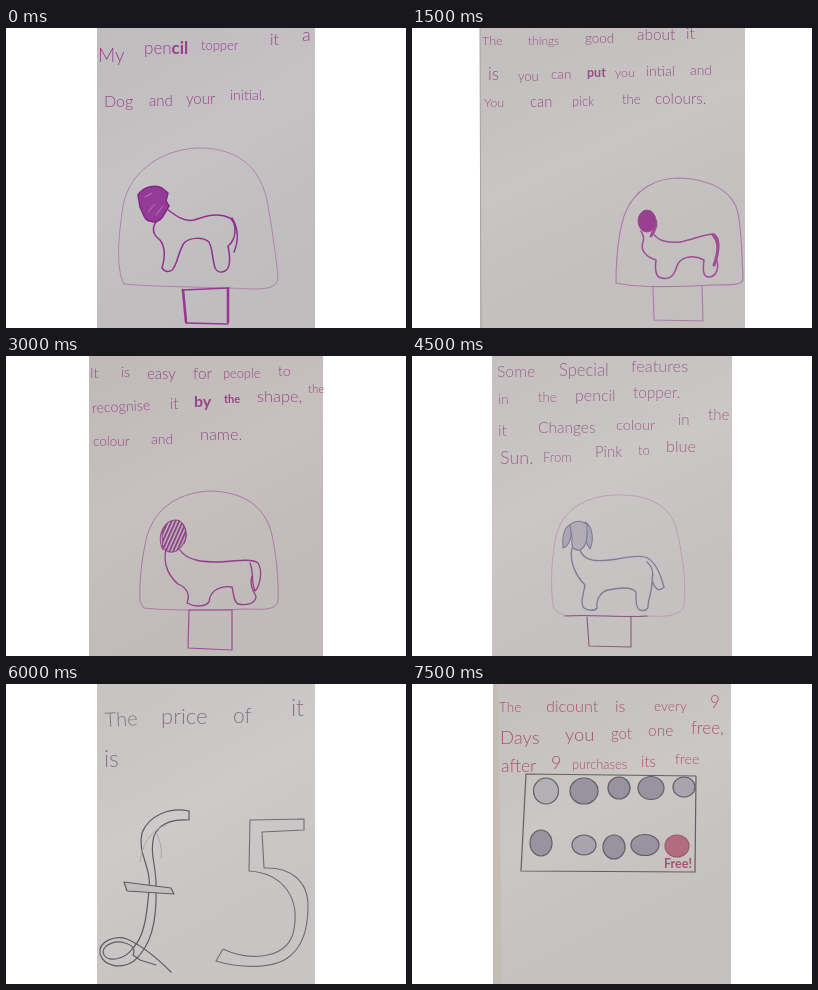
These frames come from a looping animation (400x300 px, 8 s). An HTML page:

```html
<!DOCTYPE html>
<html lang="en">
<head>
<meta charset="utf-8">
<title>Pencil topper</title>
<style>
  html, body { margin: 0; width: 100%; height: 100%; overflow: hidden; background: #fff; }
  svg { display: block; width: 100vw; height: 100vh; }
  text { font-family: Lato, "Open Sans", sans-serif; font-weight: 300; fill: var(--ink); stroke: none; }
  .page { --ink: #a0508f; fill: none; stroke: var(--ink); stroke-linecap: round; stroke-linejoin: round;
          visibility: hidden; animation: page 8s step-end infinite; animation-delay: calc(var(--i) * 1.5s - 8s); }
  .page.last { animation-name: last; }
  .paper { stroke: none; }
  .bold { font-weight: 700; }
  @keyframes page { 0% { visibility: visible } 18.75%, 100% { visibility: hidden } }
  @keyframes last { 0% { visibility: visible } 6.25%, 100% { visibility: hidden } }
</style>
</head>
<body>
<svg viewBox="0 0 400 300">
  <defs>
    <linearGradient id="shade" x1="0" y1="0" x2=".4" y2="1">
      <stop offset="0" stop-color="#000" stop-opacity=".02"/>
      <stop offset=".5" stop-color="#fff" stop-opacity=".04"/>
      <stop offset="1" stop-color="#000" stop-opacity=".02"/>
    </linearGradient>
    <pattern id="hatch" width="3.4" height="8" patternUnits="userSpaceOnUse" patternTransform="rotate(24)">
      <path d="M1 0V8" stroke="#8d4589" stroke-width="2"/>
    </pattern>
  </defs>

  <g class="page" style="--i:0; --ink:#963f90">
    <g class="paper"><path d="M91 0H309V300H91Z" fill="#c4c1c2"/><path d="M91 0H309V300H91Z" fill="url(#shade)"/></g>
    <text x="92" y="34" font-size="19">My</text>
    <text x="138" y="26" font-size="17">pen<tspan class="bold">cil</tspan></text>
    <text x="195" y="22" font-size="13">topper</text>
    <text x="264" y="17" font-size="16">it</text>
    <text x="296" y="13" font-size="18">a</text>
    <text x="98" y="79" font-size="16">Dog</text>
    <text x="143" y="78" font-size="15">and</text>
    <text x="180" y="76" font-size="15">your</text>
    <text x="224" y="72" font-size="14">initial.</text>
    <path stroke="#b283ae" d="M118 256C109 240 113 205 117 178C124 140 160 121 192 120C240 120 255 147 261 172C266 200 271 235 272 250C270 260 262 261 245 261C210 259 150 259 118 256"/>
    <path stroke="#983694" stroke-width="1.4" d="M176 262L223 260M180 295L222 296"/>
    <path stroke="#983694" stroke-width="2.6" d="M177 262L180 294M222 261L222 294"/>
    <path stroke="#93308f" stroke-width="1.5" d="M161 181C170 188 178 194 188 192C200 188 212 184 224 190C231 196 231 211 222 218C224 228 225 240 219 243C215 245 211 244 209 240C206 230 207 222 203 214C197 209 184 209 178 215C172 224 171 238 166 242C162 245 158 243 156 240C159 230 160 220 154 212C146 206 146 200 150 194M226 190C232 200 233 212 228 224"/>
    <path fill="#933b96" stroke="#862786" stroke-width="1.5" d="M132 167C137 159 149 156 156 160L162 165L160 173L163 178C159 184 157 193 148 194C143 193 140 193 138 188L134 179Z"/>
    <path stroke="#b77cba" d="M142 184L149 176M150 187L157 178M139 169L146 165"/>
  </g>

  <g class="page" style="--i:1; --ink:#984f83">
    <g class="paper"><path d="M68 0H333V300H68Z" fill="#c6c3c2"/><path d="M68 0H333V300H68Z" fill="url(#shade)"/></g>
    <path d="M68 0L69 300" stroke="#a7a3a3"/>
    <text x="70" y="17" font-size="12.6">The</text>
    <text x="116" y="17" font-size="12">things</text>
    <text x="173" y="15" font-size="13.5">good</text>
    <text x="225" y="12" font-size="15.4">about</text>
    <text x="274" y="11" font-size="16">it</text>
    <text x="76" y="52" font-size="17">is</text>
    <text x="106" y="53" font-size="13">you</text>
    <text x="139" y="51" font-size="13.5">can</text>
    <text class="bold" x="175" y="49" font-size="12.5">put</text>
    <text x="203" y="49" font-size="12.5">you</text>
    <text x="234" y="48" font-size="14">intial</text>
    <text x="278" y="47" font-size="13.8">and</text>
    <text x="72" y="79" font-size="12.6">You</text>
    <text x="118" y="79" font-size="14.8">can</text>
    <text x="160" y="78" font-size="12.8">pick</text>
    <text x="210" y="76" font-size="13.2">the</text>
    <text x="243" y="76" font-size="15.3">colours.</text>
    <path stroke="#ad7aa5" stroke-width="1.1" d="M204 255C204 230 207 205 212 188C222 160 245 150 268 150C300 151 322 165 326 185C330 205 330 230 331 252C329 257 320 257 300 257C265 259 225 260 204 255M241 259L242 292L291 293L290 258"/>
    <path stroke="#a04c98" stroke-width="1.5" d="M240 203C244 212 252 215 268 214C280 212 292 206 302 206C308 210 308 220 304 230C308 240 304 248 298 249C290 250 291 240 292 232C280 226 268 229 265 238C262 248 258 252 250 250C243 250 243 240 244 232C234 229 228 222 231 214C233 208 230 206 229 203"/>
    <path stroke="#a04c98" stroke-width="3" d="M301 207C308 214 307 224 302 237M242 190C246 196 243 202 239 208"/>
    <ellipse cx="235" cy="193" rx="9" ry="11" fill="#98408f"/>
  </g>

  <g class="page" style="--i:2; --ink:#964688">
    <g class="paper"><path d="M83 0H317V300H83Z" fill="#c4bfbc"/><path d="M83 0H317V300H83Z" fill="url(#shade)"/></g>
    <text x="84" y="22" font-size="14">It</text>
    <text x="115" y="21" font-size="14">is</text>
    <text x="141" y="23" font-size="15">easy</text>
    <text x="187" y="23" font-size="15.4">for</text>
    <text x="217" y="22" font-size="12.8">people</text>
    <text x="272" y="20" font-size="14">to</text>
    <text x="86" y="57" font-size="14.3" transform="rotate(-3 86 57)">recognise</text>
    <text x="164" y="53" font-size="15">it</text>
    <text class="bold" x="188" y="51" font-size="16">by</text>
    <text class="bold" x="218" y="47" font-size="11">the</text>
    <text x="251" y="46" font-size="16.4">shape,</text>
    <text x="302" y="37" font-size="11.5">the</text>
    <text x="87" y="90" font-size="13.5">colour</text>
    <text x="145" y="88" font-size="14">and</text>
    <text x="194" y="84" font-size="16.3">name.</text>
    <path stroke="#ad78a6" d="M134 245C133 225 136 200 141 180C150 150 175 136 205 135C240 136 258 152 265 175C270 195 273 225 272 245C270 253 262 254 240 253C200 255 150 254 138 252Z"/>
    <path stroke="#9d4e95" stroke-width="1.2" d="M183 254L182 292L226 294L226 254Z"/>
    <path stroke="#953d8d" stroke-width="1.3" d="M174 194C182 206 200 206 215 206C235 204 248 203 252 207C257 215 254 230 249 235C245 227 248 216 244 207M160 193C156 210 165 222 172 228C182 232 184 240 181 247C190 252 200 250 203 246C204 234 215 229 226 231C228 240 228 246 232 248C244 250 250 246 250 240C246 234 244 226 246 220"/>
    <path stroke="#953d8d" fill="url(#hatch)" d="M156 176C158 166 167 162 174 165C181 170 182 182 177 188C173 197 162 199 157 192Z"/>
    <path stroke="#953d8d" d="M159 170C153 176 153 187 157 194M174 165C180 170 182 180 178 188"/>
  </g>

  <g class="page" style="--i:3; --ink:#9a6189">
    <g class="paper"><path d="M80 0H320V300H80Z" fill="#c8c5c4"/><path d="M80 0H320V300H80Z" fill="url(#shade)"/></g>
    <text x="85" y="21" font-size="15.8">Some</text>
    <text x="147" y="20" font-size="16.6">Special</text>
    <text x="219" y="16" font-size="16.4">features</text>
    <text x="86" y="48" font-size="14">in</text>
    <text x="126" y="46" font-size="13.3">the</text>
    <text x="163" y="45" font-size="16">pencil</text>
    <text x="221" y="42" font-size="15.4">topper.</text>
    <text x="86" y="80" font-size="16">it</text>
    <text x="126" y="77" font-size="15.5">Changes</text>
    <text x="204" y="74" font-size="14.5">colour</text>
    <text x="266" y="69" font-size="15">in</text>
    <text x="296" y="64" font-size="15">the</text>
    <text x="88" y="108" font-size="18">Sun.</text>
    <text x="131" y="106" font-size="13">From</text>
    <text x="183" y="101" font-size="15">Pink</text>
    <text x="226" y="99" font-size="13">to</text>
    <text x="254" y="96" font-size="16.3">blue</text>
    <path stroke="#ba9ab4" stroke-width=".9" d="M141 250C138 225 140 200 144 180C151 150 180 138 210 139C245 140 262 155 266 180C272 205 274 235 272 250C268 260 255 261 235 260C205 261 170 259 156 260C147 258 142 254 141 250"/>
    <path stroke="#8a5a7f" stroke-width="1.1" d="M153 260C180 258 210 262 235 260M175 261L177 290L219 291L219 261"/>
    <path stroke="#817d98" stroke-width="1.4" d="M160 192C157 206 164 220 173 229C171 240 168 248 172 252C176 255 183 255 185 252C184 244 188 236 196 234C210 231 220 231 224 236C224 246 224 252 228 254Q234 256 236 251C236 243 240 236 240 226M168 194C172 206 185 206 205 203C220 200 232 199 237 203C245 208 249 220 252 231C247 236 243 234 240 224C242 216 240 210 235 206"/>
    <path stroke="#817d98" stroke-width="1.1" fill="#aaa6b2" d="M160 168C152 170 150 180 151 192C157 190 160 182 160 168M173 166C181 170 182 184 178 193C174 188 172 178 173 166"/>
    <path stroke="#817d98" stroke-width="1.2" fill="#b1adb7" d="M158 169C163 164 171 164 175 169C175 180 176 190 168 194C161 195 159 190 160 182Z"/>
  </g>

  <g class="page" style="--i:4; --ink:#8c7186">
    <g class="paper"><path d="M91 0H309V300H91Z" fill="#cbc9c8"/><path d="M91 0H309V300H91Z" fill="url(#shade)"/></g>
    <text x="99" y="43" font-size="20" transform="rotate(-3 99 43)">The</text>
    <text x="155" y="40" font-size="22">price</text>
    <text x="227" y="39" font-size="21">of</text>
    <text x="285" y="32" font-size="23">it</text>
    <text x="98" y="83" font-size="23">is</text>
    <g stroke="#5e5c5e" stroke-width="1.2">
      <path d="M183 127C164 123 143 131 136 149C131 169 146 184 143 205C141 232 138 253 127 264M183 136C168 135 154 138 148 152C143 169 151 184 150 204C151 238 145 262 128 277C114 286 98 282 94 270C92 257 109 251 121 255C137 262 151 274 165 288M183 127V136M127 264C118 277 99 279 97 268C98 260 110 256 119 259C126 261 130 265 127 271L134 276L150 281"/>
      <path fill="#c0bebe" d="M118 198L165 204L168 210L121 207Z"/>
      <path stroke="#706d70" stroke-width="1.1" d="M244 136L298 135L298 146L256 148L258 184C285 183 302 197 302 222C302 240 299 260 284 272C268 286 232 284 210 277L217 265C240 276 278 277 287 250C296 212 275 189 243 187Z"/>
    </g>
    <path stroke="#aaa6a7" d="M160 141C145 146 136 160 134 178M151 150C155 160 156 166 155 174"/>
  </g>

  <g class="page last" style="--i:5; --ink:#aa5073">
    <g class="paper"><path d="M81 0H319V300H81Z" fill="#c9c5c2"/><path d="M81 0H319V300H81Z" fill="url(#shade)"/><path d="M81 0H86L90 300H81Z" fill="#c3bdb3"/></g>
    <text x="87" y="28" font-size="13.5">The</text>
    <text x="134" y="28" font-size="16.2">dicount</text>
    <text x="203" y="28" font-size="16">is</text>
    <text x="242" y="27" font-size="13.8">every</text>
    <text x="298" y="24" font-size="17">9</text>
    <text x="88" y="60" font-size="18.5">Days</text>
    <text x="153" y="57" font-size="18.4">you</text>
    <text x="199" y="55" font-size="15">got</text>
    <text x="236" y="52" font-size="15.5">one</text>
    <text x="279" y="50" font-size="17">free,</text>
    <text x="89" y="88" font-size="17.6">after</text>
    <text x="139" y="85" font-size="18">9</text>
    <text x="160" y="85" font-size="12.8">purchases</text>
    <text x="229" y="83" font-size="15">its</text>
    <text x="263" y="80" font-size="14.3">free</text>
    <g stroke="#625e66" stroke-width="1.2" fill="#98939f">
      <path fill="none" d="M114 90L284 92L283 188L109 187Z"/>
      <ellipse cx="134" cy="107" rx="12.5" ry="13" fill="#b4afb5"/>
      <ellipse cx="172" cy="107" rx="14" ry="13"/>
      <ellipse cx="207" cy="104" rx="11" ry="11"/>
      <ellipse cx="239" cy="104" rx="13" ry="11.5"/>
      <ellipse cx="272" cy="103" rx="11" ry="10" fill="#a8a3ac"/>
      <ellipse cx="129" cy="159" rx="11" ry="13"/>
      <ellipse cx="172" cy="161" rx="12" ry="10" fill="#a8a3ac"/>
      <ellipse cx="202" cy="163" rx="11" ry="12"/>
      <ellipse cx="233" cy="161" rx="14" ry="10.5"/>
      <ellipse cx="265" cy="162" rx="12" ry="11" fill="#b26c80" stroke="#9a5a6e"/>
    </g>
    <text class="bold" x="252" y="184" font-size="12.5" fill="#b0476b">Free!</text>
  </g>
</svg>
</body>
</html>
```
